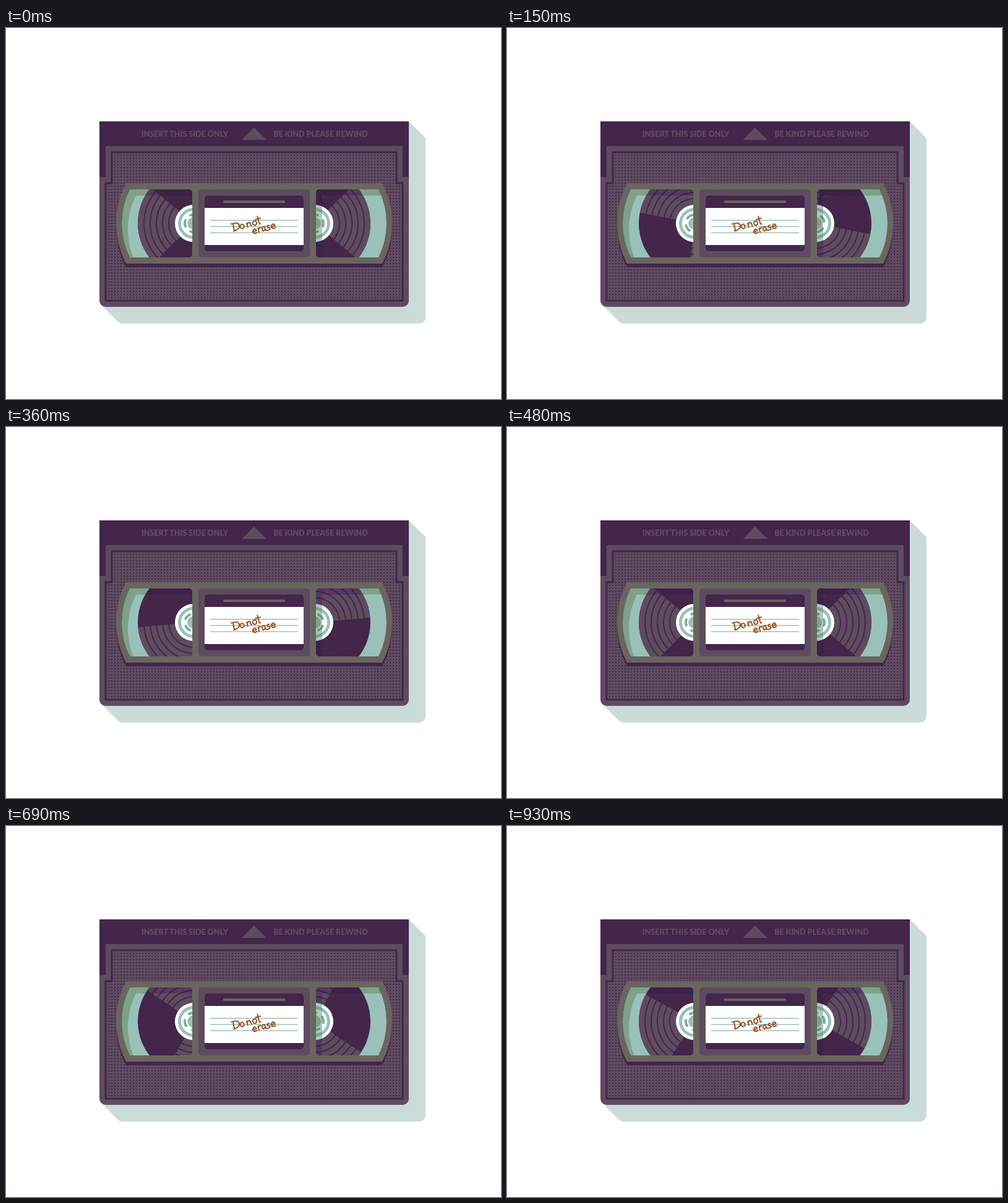
These frames come from a looping animation (800 px wide and 600 px high, 0.96 s). An HTML page:

```html
<!DOCTYPE html>
<html lang="en">
<head>
<meta charset="utf-8">
<title>Video cassette</title>
<style>
  html, body { margin: 0; width: 100%; height: 100%; overflow: hidden; background: #fff; }
  svg { display: block; width: 800px; height: 600px; }
  svg { --dark: #43264a; --mid: #5f4b60; --frame: #6a655f; --teal: #9ac1b9; --white: #fff; --spoke: #83ab98; --band: var(--mid); }
  .shade { --dark: #3d2146; --teal: #7fa18b; --white: #aacbc2; --spoke: #6d9380; --band: #56395e; }
  .dark { fill: var(--dark); }
  .mid { fill: var(--mid); }
  .frame { fill: var(--frame); }
  .teal { fill: var(--teal); }
  .white { fill: var(--white); }
  .band { fill: var(--band); }
  .line { fill: none; stroke: var(--dark); }
  .title { font: 900 12.5px Lato, sans-serif; text-anchor: middle; }
  .ink { fill: none; stroke: #985322; stroke-width: 2; stroke-linecap: round; stroke-linejoin: round; }
</style>
</head>
<body>
<svg viewBox="0 0 800 600">
  <defs>
    <pattern id="dots" width="5" height="5" x="160" y="200" patternUnits="userSpaceOnUse">
      <rect class="dark" width="2" height="2"/>
    </pattern>
    <path id="frame" d="M194 251H608A140 140 0 0 1 608 381H194A140 140 0 0 1 194 251Z"/>
    <path id="windowL" d="M296 261a5 5 0 0 1 5 5v100a5 5 0 0 1-5 5H200A123 123 0 0 1 200 261Z"/>
    <path id="windowR" d="M506 261H602A123 123 0 0 1 602 371H506a5 5 0 0 1-5-5V266a5 5 0 0 1 5-5Z"/>
    <clipPath id="clipL"><use href="#windowL"/></clipPath>
    <clipPath id="clipR"><use href="#windowR"/></clipPath>
    <clipPath id="litL"><use href="#windowL" x="10" y="10"/></clipPath>
    <clipPath id="litR"><use href="#windowR" x="10" y="10"/></clipPath>

    <g id="reel">
      <circle class="dark" r="90"/>
      <path class="band" d="M63.6-63.6A90 90 0 0 1 68.9 57.9L-68.9-57.9A90 90 0 0 0-63.6 63.6Z"/>
      <g class="line" stroke-width="2">
        <circle r="80"/><circle r="70"/><circle r="60"/><circle r="50"/><circle r="40"/>
      </g>
      <circle class="white" r="30"/>
      <circle r="22.5" fill="none" stroke="var(--teal)" stroke-width="5"/>
      <circle r="14" fill="none" stroke="var(--spoke)" stroke-width="4" stroke-linecap="round"
        pathLength="360" stroke-dasharray="40 50" stroke-dashoffset="20"/>
      <circle class="teal" r="10"/>
    </g>
    <g id="sceneL">
      <use class="teal" href="#windowL"/>
      <g transform="translate(303 316)"><use class="spin" href="#reel"/></g>
    </g>
    <g id="sceneR">
      <use class="teal" href="#windowR"/>
      <g transform="translate(499 316)"><use class="spin" href="#reel"/></g>
    </g>
  </defs>

  <!-- Body and its long shadow -->
  <path fill="#cbdbd8" d="M651 151L678 178V468a10 10 0 0 1-10 10H188Q184 478 181 475L154 448Z"/>
  <path class="dark" d="M151 151H651V245H151Z"/>
  <path class="mid" d="M161 191H641V241H651V441a10 10 0 0 1-10 10H161a10 10 0 0 1-10-10V241H161Z"/>
  <path id="grip" fill="url(#dots)" d="M171 201H631V251H641V441H161V251H171Z"/>
  <path class="line" stroke-width="3" d="M171 201H631V251H641V441H161V251H171Z"/>
  <g class="mid">
    <text class="title" x="289" y="176">INSERT THIS SIDE ONLY</text>
    <text class="title" x="508.5" y="176">BE KIND PLEASE REWIND</text>
    <path d="M401 161L421 181H381Z"/>
  </g>

  <!-- Windows with reels -->
  <use class="dark" href="#frame" y="6"/>
  <use class="frame" href="#frame"/>
  <g clip-path="url(#clipL)">
    <use class="shade" href="#sceneL"/>
    <g clip-path="url(#litL)"><use href="#sceneL"/></g>
  </g>
  <g clip-path="url(#clipR)">
    <use class="shade" href="#sceneR"/>
    <g clip-path="url(#litR)"><use href="#sceneR"/></g>
  </g>

  <!-- Label -->
  <rect class="mid" x="311" y="261" width="180" height="110" rx="5"/>
  <rect class="dark" x="321" y="271" width="160" height="90" rx="5"/>
  <path class="frame" d="M351 279H451V283H351Z"/>
  <path class="white" d="M321 291H481V351H321Z"/>
  <path d="M330 311H472M330 321H472M330 331H472" stroke="#b3d0ca" stroke-width="2"/>
  <g class="ink" role="img" aria-label="Do not erase">
    <path transform="translate(369 328) rotate(-15)"
      d="M0 0L1-12M-2-12Q10-13 10-6Q9 0-1 0M14-7a3.2 3.5 0 1 0 .1 0M22.5 0V-7M22.5-4Q25-8 27.5-6.5Q28.5-5 28.5 0M35-7a3.2 3.5 0 1 0 .1 0M42-13V-2Q42 1 44 0M38-9H46"/>
    <path transform="translate(400 333) rotate(-15)"
      d="M0-3.5L6-4Q5-8 2.5-7Q-1-5 0-2Q2 1 6-1M9.5 0V-7M9.5-4Q10.5-8 14-6.5M20.5-6Q16-9 15.5-3Q16 2 20.5-3M20.5-7V-1L22 0M28-7Q23-7 24.5-4.5Q29-3 28-1Q26 1 23.5 0M31-3.5L37-4Q36-8 33.5-7Q30-5 31-2Q33 1 37-1"/>
  </g>
</svg>
<script>
  const LOOP = 960, STEP = 30;
  const reels = document.querySelectorAll('.spin');

  function draw(now) {
    const time = Math.floor(now % LOOP / STEP) * STEP;
    const angle = time / LOOP * 360;
    reels.forEach(reel => reel.setAttribute('transform', `rotate(${angle})`));
    requestAnimationFrame(draw);
  }
  draw(performance.now());
</script>
</body>
</html>
```
